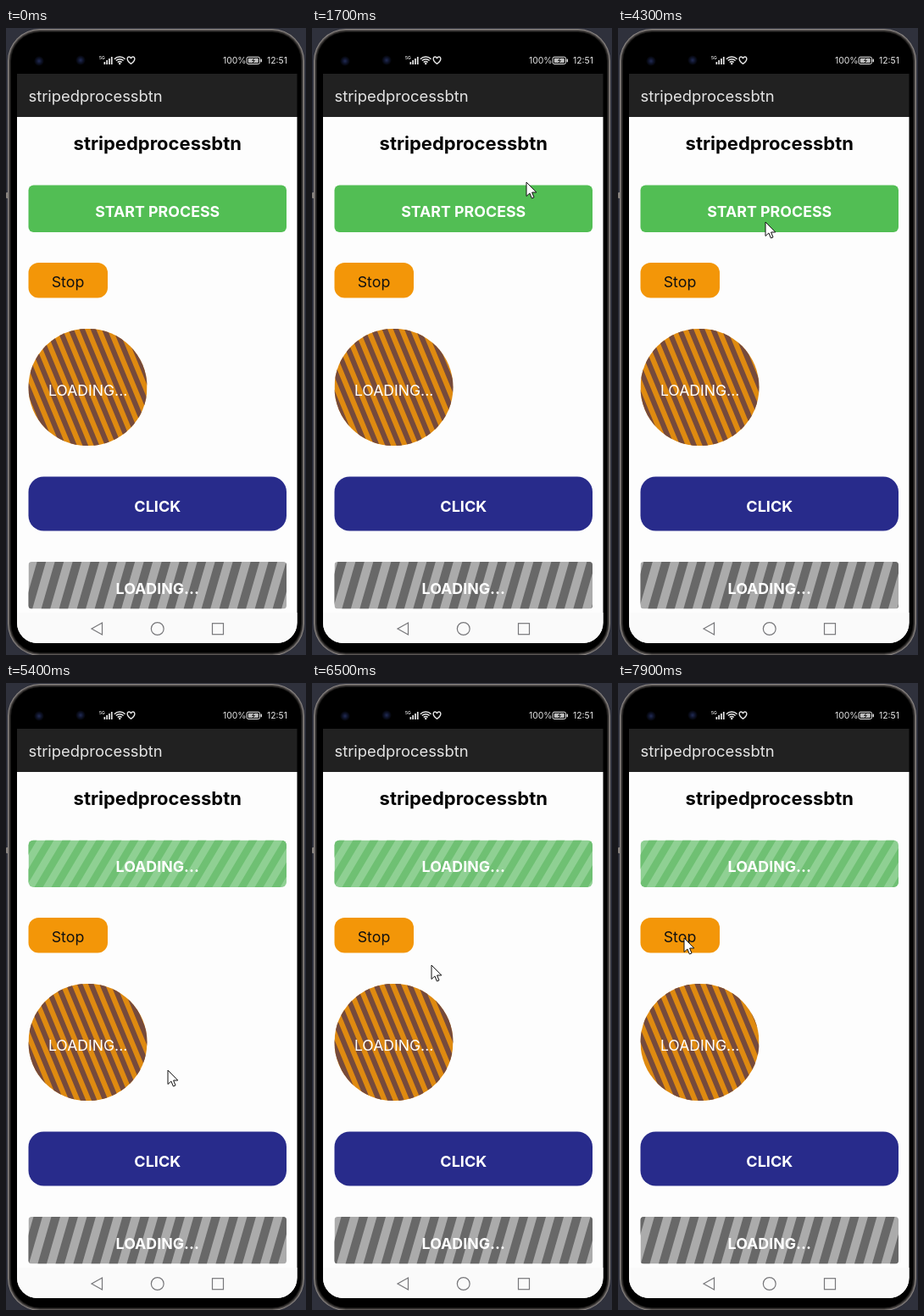
An HTML page with a canvas for the animation above (8 s loop, 354x740 px).

```html
<!DOCTYPE html>
<html lang="en">
<head>
<meta charset="utf-8">
<title>stripedprocessbtn</title>
<style>
html, body { margin: 0; width: 100%; height: 100%; overflow: hidden; background: #2f313c; }
canvas { display: block; width: 354px; height: 740px; }
</style>
</head>
<body>
<canvas id="stage"></canvas>
<script>
const W = 354, H = 740, LOOP = 8000, STEP = 100;
const LEFT = 26.5, FULL = 304.5, MID = LEFT + FULL / 2;
const FONT = 'Inter, "Open Sans", sans-serif';
const PAUSE_FROM = 2700, PAUSE_TO = 4300, CLICK_AT = 4500;

// Places where the pointer rests or turns
const stops = [
  { t: 1100, x: 296, y: 745 },
  { t: 1700, x: 253, y: 182 },
  { t: 2700, x: 152, y: 512 },
  { t: 3300, x: 40, y: 300 },
  { t: 4300, x: 174, y: 229 },
  { t: 5400, x: 191, y: 457 },
  { t: 6500, x: 141, y: 333 },
  { t: 7800, x: 78, y: 301 }
];
const arrow = new Path2D('M0 0V16.5L3.9 13L6.4 19L9 17.9L6.6 12H11.8Z');
const heart = new Path2D('M147.5 42.3C139.5 36.5 144.5 31.5 147.5 35.5C150.5 31.5 155.5 36.5 147.5 42.3Z');
const back = new Path2D('M101 709L113.5 702V716Z');
const bolt = new Path2D('M293 35.8L290.5 38.5H293.5L291 41');

const green = { base: '#8fd093', band: '#6fc073', gap: 20, tilt: 33, phase: 0.55 };
const orange = { base: '#df8a10', band: '#754a3c', gap: 13.2, tilt: -57, phase: 0.85 };
const gray = { base: '#ababab', band: '#686868', gap: 21, tilt: 16, phase: 0.72 };

const canvas = document.getElementById('stage');
const c = canvas.getContext('2d');
const dpr = window.devicePixelRatio || 1;
canvas.width = W * dpr;
canvas.height = H * dpr;

function box(x, y, w, h, r) {
  c.beginPath();
  c.roundRect(x, y, w, h, r);
}

function fillBox(x, y, w, h, r, color) {
  box(x, y, w, h, r);
  c.fillStyle = color;
  c.fill();
}

function disc(x, y, r) {
  c.beginPath();
  c.arc(x, y, r, 0, Math.PI * 2);
}

function text(str, x, y, size, weight, color, align = 'center') {
  c.font = `${weight} ${size}px ${FONT}`;
  c.textAlign = align;
  c.fillStyle = color;
  c.fillText(str, x, y);
}

// Slanted bands; tilt is the shift of the top edge against the bottom edge.
function stripes(x, y, w, h, r, look, turns) {
  const { base, band, gap, tilt, phase } = look;
  const lead = Math.ceil(Math.abs(tilt) / gap) + 1;
  c.save();
  box(x, y, w, h, r);
  c.clip();
  c.fillStyle = base;
  c.fillRect(x, y, w, h);
  c.fillStyle = band;
  const first = x + ((turns + phase) % 1 - lead) * gap;
  for (let p = first; p < x + w + lead * gap; p += gap) {
    c.beginPath();
    c.moveTo(p, y + h);
    c.lineTo(p + tilt, y);
    c.lineTo(p + tilt + gap / 2, y);
    c.lineTo(p + gap / 2, y + h);
    c.fill();
  }
  c.restore();
}

function phone() {
  const rim = ['#8b8683', '#5d5957', '#353231', '#1a1918', '#000'];
  c.fillStyle = '#2f313c';
  c.fillRect(0, 0, W, H);
  fillBox(0, 194, 3, 7, 1, '#85807c');
  rim.forEach((color, i) => fillBox(2 + i, 1 + i, W - 4 - 2 * i, H - 2 * i, 38 - i, color));

  c.save();
  box(13, 9, 330.5, 717, [28, 28, 24, 24]);
  c.clip();
  c.fillStyle = '#212121';
  c.fillRect(13, 54, 331, 51);
  c.fillStyle = '#fdfdfd';
  c.fillRect(13, 105, 331, 622);
  c.fillStyle = '#fafafa';
  c.fillRect(13, 690, 331, 37);
  c.restore();
}

function lens(x, y) {
  const g = c.createRadialGradient(x, y, 0, x, y, 6);
  g.addColorStop(0, '#222c55');
  g.addColorStop(0.5, '#0e1329');
  g.addColorStop(1, '#000');
  c.fillStyle = g;
  disc(x, y, 6);
  c.fill();
}

function statusBar() {
  const ink = '#e8e8e8';
  lens(39, 39);
  lens(88, 38);
  text('5G', 110, 37, 5, 600, ink, 'left');
  for (let i = 0; i < 4; i++) c.fillRect(115.5 + i * 2.8, 40 - i * 2, 1.7, 3 + i * 2);
  c.strokeStyle = ink;
  c.lineWidth = 1.4;
  for (let r = 3.5; r < 10; r += 2.75) {
    c.beginPath();
    c.arc(134.2, 43, r, -Math.PI * 0.75, -Math.PI * 0.25);
    c.stroke();
  }
  disc(134.2, 42, 1.2);
  c.fill();
  c.stroke(heart);

  text('100%', 256, 42.3, 10.4, 400, ink, 'left');
  box(284, 34.2, 15.5, 8.3, 2);
  c.lineWidth = 1;
  c.stroke();
  fillBox(285.7, 35.8, 12.1, 5.1, 1, '#bcbcbc');
  fillBox(300.6, 36.5, 1.4, 3.7, 0.5, ink);
  c.strokeStyle = '#222';
  c.stroke(bolt);
  text('12:51', 332, 42.3, 10.4, 400, ink, 'right');
}

function navBar() {
  c.strokeStyle = '#77777a';
  c.lineWidth = 1.2;
  c.stroke(back);
  disc(MID, 709, 7.4);
  c.stroke();
  c.strokeRect(243.5, 702.7, 13, 13);
}

function pointer(t) {
  if (t < stops[0].t) return;
  const next = stops.findIndex(s => s.t > t);
  const b = next < 0 ? stops[stops.length - 1] : stops[next];
  const a = next < 0 ? b : stops[next - 1];
  const k = a === b ? 0 : (t - a.t) / (b.t - a.t);
  const e = k * k * (3 - 2 * k);
  c.save();
  c.translate(a.x + (b.x - a.x) * e, a.y + (b.y - a.y) * e);
  c.fillStyle = '#fff';
  c.fill(arrow);
  c.strokeStyle = '#111';
  c.lineWidth = 1;
  c.stroke(arrow);
  c.restore();
}

function draw(t) {
  const paused = Math.max(0, Math.min(t, PAUSE_TO) - PAUSE_FROM);
  const turns = (t - paused) / 1000;
  c.setTransform(dpr, 0, 0, dpr, 0, 0);
  phone();
  statusBar();
  text('stripedprocessbtn', LEFT, 87, 18.4, 400, '#e4e4e4', 'left');
  text('stripedprocessbtn', MID, 143.5, 22, 700, '#050505');

  if (t < CLICK_AT) fillBox(LEFT, 185.5, FULL, 55.5, 6, '#52be54');
  else stripes(LEFT, 185.5, FULL, 55.5, 6, green, turns);
  text(t < CLICK_AT ? 'START PROCESS' : 'LOADING...', MID, 223, 17.8, 700, '#fff');

  fillBox(LEFT, 277, 93.5, 41.5, 12, '#f39608');
  text('Stop', 73, 306, 17.8, 400, '#111');

  stripes(LEFT, 355, 140, 138, 69, orange, turns);
  text('LOADING...', 96.6, 434, 17.6, 400, '#fff');

  fillBox(LEFT, 529.5, FULL, 64, 18, '#282b8b');
  text('CLICK', MID, 571.3, 18, 700, '#fff');

  stripes(LEFT, 630, FULL, 55.5, 4, gray, turns);
  text('LOADING...', MID, 667.5, 17.8, 700, '#fff');

  navBar();
  pointer(t);
}

const begin = performance.now();
function frame() {
  const t = (performance.now() - begin) % LOOP;
  draw(Math.floor(t / STEP) * STEP);
  requestAnimationFrame(frame);
}
frame();
</script>
</body>
</html>
```
